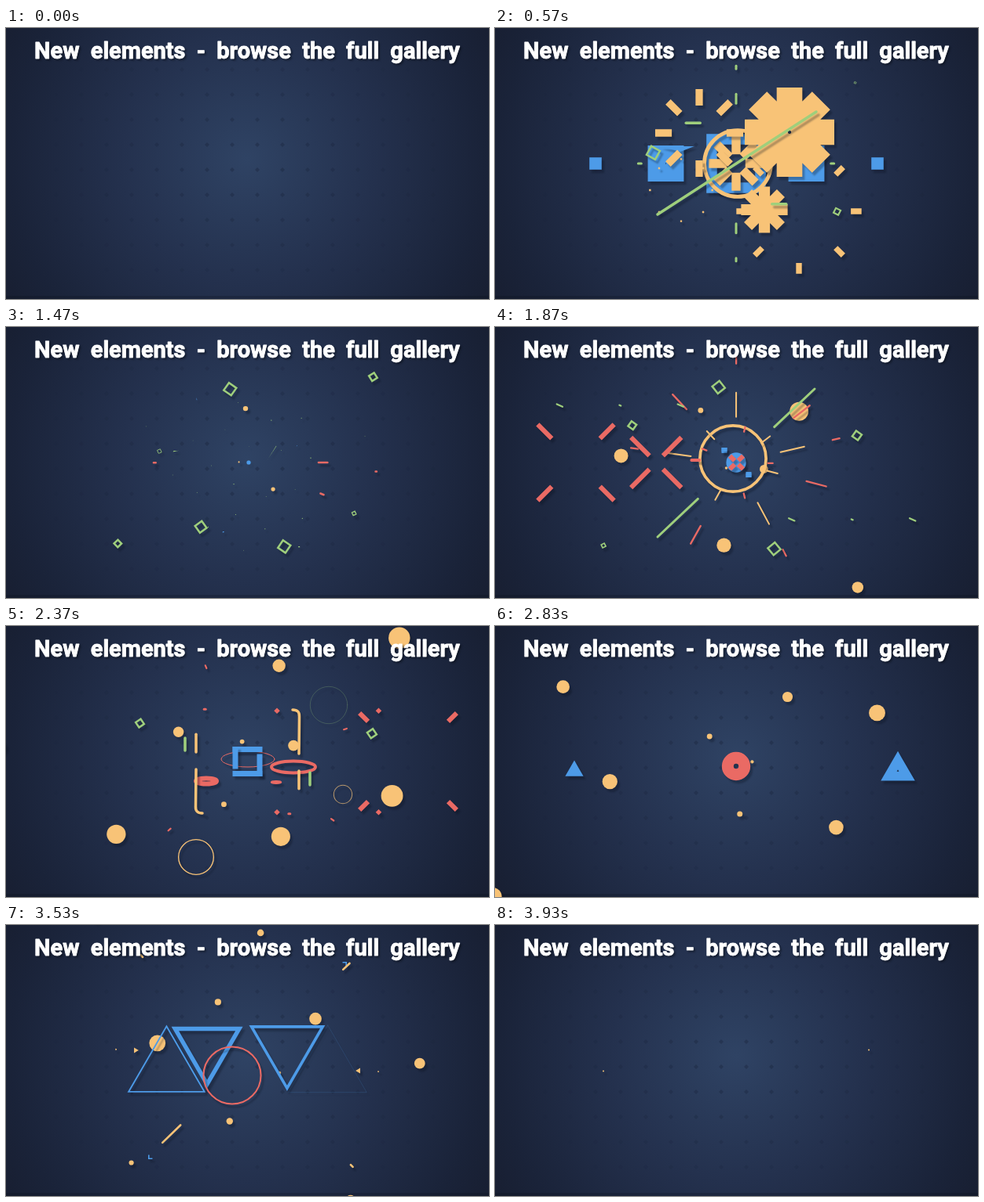
Animation, 615 px wide and 346 px high, one loop 3.96 s. Source, as an HTML page with a canvas:

```html
<!DOCTYPE html>
<html lang="en">
<head>
<meta charset="utf-8">
<title>New elements</title>
<style>
html, body { margin: 0; width: 100%; height: 100%; overflow: hidden; background: #182033; }
canvas, svg { position: absolute; left: 0; top: 0; }
canvas { background: radial-gradient(circle 353px at 307px 167px, #2f4364, #24314e 45%, #1a2339 85%, #181f32); }
text { font: 700 29px Roboto, "Open Sans", sans-serif; word-spacing: 7px; fill: #fff; stroke: #fff;
  stroke-width: .9; stroke-linejoin: round; filter: drop-shadow(2px 2px 1px rgba(8, 12, 24, .55)); }
</style>
</head>
<body>
<canvas id="stage" width="615" height="346"></canvas>
<svg width="615" height="346"><text x="307" y="39" text-anchor="middle">New elements - browse the full gallery</text></svg>
<script>
const g = document.getElementById('stage').getContext('2d');
const BLUE = '#4d9be8', GREEN = '#9fcf7c', ORANGE = '#f8c377', RED = '#ea6a64';
const CX = 307, CY = 173, LOOP = 3960, TAU = Math.PI * 2, GOLDEN = 2.39996;
let t = 0;

const clamp = v => Math.max(0, Math.min(1, v));
const out = p => 1 - (1 - p) ** 2;
const random = n => { const v = Math.sin(n * 12.9898) * 43758.5453; return v - Math.floor(v); };
// progress that equals p at time T
const at = (T, p, D) => p + (t - T) / D;
// 0 at T - a, 1 at T, 0 at T + b
const bell = (T, a, b) => clamp(t < T ? 1 + (t - T) / a : 1 - (t - T) / b);

function paint(color, width, draw) {
  g.beginPath();
  draw();
  g.fillStyle = g.strokeStyle = color;
  g.lineWidth = width;
  width ? g.stroke() : g.fill();
}
function disc(x, y, r, color, width = 0) {
  if (r > .2) paint(color, width, () => g.arc(x, y, r, 0, TAU));
}
function line(color, width, ...p) {
  paint(color, width, () => { for (let i = 0; i < p.length; i += 2) g.lineTo(p[i], p[i + 1]); });
}
// part a..b of a segment
function trim(x1, y1, x2, y2, a, b, color, width) {
  if (b - a < .01) return;
  const dx = x2 - x1, dy = y2 - y1;
  line(color, width, x1 + dx * a, y1 + dy * a, x1 + dx * b, y1 + dy * b);
}
function poly(x, y, r, n, rot, color, width) {
  if (r > .2) paint(color, width, () => {
    for (let i = 0; i < n; i++) g.lineTo(x + r * Math.cos(rot + i * TAU / n), y + r * Math.sin(rot + i * TAU / n));
    g.closePath();
  });
}
// bars around a point, filled as one shape
function rays(x, y, n, rot, inner, outer, w, color) {
  paint(color, 0, () => {
    for (let i = 0; i < n; i++) {
      const a = rot + i * TAU / n, c = Math.cos(a), s = Math.sin(a), h = w / 2;
      g.moveTo(x + c * inner + s * h, y + s * inner - c * h);
      g.lineTo(x + c * outer + s * h, y + s * outer - c * h);
      g.lineTo(x + c * outer - s * h, y + s * outer + c * h);
      g.lineTo(x + c * inner - s * h, y + s * inner + c * h);
      g.closePath();
    }
  });
}
// square that grows while its border thins
function frame(x, y, max, W, T, p, D, color) {
  p = at(T, p, D);
  if (p <= 0 || p >= 1) return;
  const s = max * out(p), w = Math.min(W * (1 - p), s / 2);
  paint(color, w, () => g.rect(x - s / 2 + w / 2, y - s / 2 + w / 2, s - w, s - w));
}
function ring(x, y, max, W, T, p, D, color) {
  p = at(T, p, D);
  if (p <= 0 || p >= 1) return;
  const r = max * out(p);
  disc(x, y, r, color, Math.min(W * (1 - p), r * 1.5));
}
function burst(x, y, max, W, p) {
  p = at(570, p, 450);
  if (p <= 0 || p >= 1) return;
  const r = max * out(p);
  rays(x, y, 8, 0, r * clamp((p - .35) / .63), r, Math.min(W * (1 - p), r), ORANGE);
}
// dash drifting away from the centre
function dash(T, x, y, angle, len, color, width) {
  const e = out(bell(T, 330, 420)), d = Math.hypot(x, y), k = 1 + (t - T) * .1 / d;
  if (!e) return;
  const dx = Math.cos(angle) * len * e / 2, dy = Math.sin(angle) * len * e / 2;
  x = CX + x * k;
  y = CY + y * k;
  line(color, width, x - dx, y - dy, x + dx, y + dy);
}
// radial dashes at one distance
function fan(T, angles, d, len, color, width) {
  for (const a of angles) dash(T, d * Math.cos(a), d * Math.sin(a), a, len, color, width);
}
// the same dash on both sides of the centre
function pair(T, x, y, angle, len, color, width) {
  for (const s of [-1, 1]) dash(T, s * x, s * y, angle, len, color, width);
}
// liquid stroke: thin tail, curve handle, round head
function taper(x0, y0, hx, hy, x1, y1, r, color) {
  const a = clamp((t - 1070) / 420), b = out(clamp(1 + (t - 1070) / 320));
  if (a >= 1 || b <= 0) return;
  paint(color, 0, () => {
    for (let i = 0; i <= 80; i++) {
      const s = i / 80, u = a + (b - a) * s, v = 1 - u, rad = (r * s ** 1.2 + .4) * (1 - a);
      const x = v * v * x0 + 2 * u * v * hx + u * u * x1, y = v * v * y0 + 2 * u * v * hy + u * u * y1;
      g.moveTo(x + rad, y);
      g.arc(x, y, rad, 0, TAU);
    }
  });
}

function backdrop() {
  g.shadowColor = 'transparent';
  for (let x = 64; x < 560; x += 32) for (let y = 53; y < 330; y += 32) {
    const a = .25 * clamp(1.15 - Math.hypot((x - CX) / 235, (y - CY) / 185));
    poly(x, y, 3, 4, 0, `rgba(14,20,38,${a})`, 0);
  }
  g.fillStyle = 'rgba(10,14,26,.22)';
  g.fillRect(0, 342, 615, 4);
  g.shadowColor = 'rgba(10,15,30,.3)';
}

// steady stream of growing balls from the centre
function stream() {
  for (let i = 0; i < 28; i++) {
    const age = t - 1280 - i * 78;
    if (age <= 0) continue;
    const d = age * (.25 + .2 * random(i + 40)), a = i * GOLDEN - 1.6;
    const r = (4 + 10 * random(i + 7)) * out(clamp(age / 550)) * clamp((3880 - t) / 450);
    disc(CX + d * Math.cos(a), CY + d * Math.sin(a), r, ORANGE);
  }
}

// x, y, size, birth
const diamonds = [
  [199, 159, 13, 300], [439, 236, 8, 350], [464, 66, 8, 500], [249, 254, 11, 600], [143, 276, 7, 780],
  [285, 78, 12, 1050], [355, 282, 12, 1080], [173, 125, 8, 1450], [463, 138, 9, 1450]
];
function drawDiamonds() {
  for (const [x, y, size, birth] of diamonds) {
    const age = (t - birth) / 1250, k = clamp(age * 5) * clamp((1 - age) * 5), drift = .96 + .08 * age;
    poly(CX + (x - CX) * drift, CY + (y - CY) * drift, size * k * .68, 4, age * .9 + 1.1, GREEN, 2.5 * k);
  }
}

function gears() {
  frame(CX, CY, 88, 36, 570, .63, 600, BLUE);
  for (const s of [-1, 1]) {
    frame(CX + s * 89.5, CY, 60, 46, 570, .52, 600, BLUE);
    frame(CX + .5 + s * 179.5, CY, 60, 36, 570, .145, 610, BLUE);
  }
  const e = bell(570, 120, 150);
  if (e) paint(BLUE, 0, () => { g.moveTo(210, 151); g.lineTo(210 + 45 * e, 151); g.lineTo(236, 158); });
  burst(CX, CY, 43, 26, .57);
  ring(309, 173, 45, 20, 570, .77, 400, ORANGE);
  burst(387, 234, 81, 58, .88);
  burst(260, 134, 60, 36, .75);
  burst(237, 207, 41, 40, .95);
  burst(375, 133, 94, 52, .38);
  burst(343, 232, 51, 22, .36);
  pair(570, 0, 83, TAU / 4, 12, GREEN, 3);
  pair(570, 0, 123, TAU / 4, 4, GREEN, 3);
  pair(570, 123, 0, 0, 4, GREEN, 3);
  pair(570, 55, 52, 0, 18, GREEN, 3.5);
  trim(207, 238, 409, 107, out(clamp((t - 575) / 260)), out(clamp((t - 330) / 235)), GREEN, 3.5);
}

function liquid() {
  const r = 64 * out(clamp((t - 720) / 330)) * clamp((1480 - t) / 330);
  if (r > 1) {
    disc(309, 173, r, BLUE, 3 * Math.min(1, r / 30));
    g.save();
    g.beginPath();
    g.arc(309, 173, r, 0, TAU);
    g.clip();
    const top = 162 + 60 * clamp((930 - t) / 200);
    paint(BLUE, 0, () => {
      for (let x = 240; x <= 380; x += 4) g.lineTo(x, top - 5 * Math.sin((x - 300) / 22 + (t - 1070) / 90));
      g.lineTo(380, 240);
      g.lineTo(240, 240);
    });
    g.restore();
  }
  taper(381, 151, 376, 147, 370, 152, 4, BLUE);
  taper(250, 63, 237, 60, 243, 93, 6, BLUE);
  taper(290, 250, 294, 262, 276, 262, 7, BLUE);
  const e = out(bell(1070, 300, 250));
  poly(322, 126, 56 * e, 3, -1.02, GREEN, 3 * e);
  // splash: a golden spiral of drops
  for (let i = 1; i < 20; i++) {
    const d = 23 * Math.sqrt(i) * out(clamp((t - 770) / 420)), a = i * GOLDEN;
    const size = (4 + 8 * random(i)) * bell(1070, 250, 420);
    disc(CX + d * Math.cos(a), CY + 12 + d * Math.sin(a), size, GREEN);
  }
  fan(1070, [0], 57, 106, RED, 2.5);
  fan(1070, [.4], 64, 42, RED, 2.5);
  fan(1070, [3.14], 78, 26, RED, 2.5);
  fan(1070, [.07], 125, 13, RED, 2.5);
  frame(278, 174, 80, 34, 1070, .68, 500, RED);
  taper(345, 152, 280, 147, 213, 159, 6.2, GREEN);
  taper(245, 256, 231, 332, 344, 152, 6.2, GREEN);
  taper(322, 235, 350, 282, 374, 281, 6.2, GREEN);
}

// row of four-armed pops, left to right
function crosses() {
  for (let i = 0; i < 5; i++) {
    const age = t - 1570 - i * 100;
    if (age <= 0 || age >= 550) continue;
    const r = 46 * (1 - Math.cos(Math.PI * Math.min(1, age / 520)));
    const len = Math.min(r * 1.15, (550 - age) * .1);
    rays(103 + i * 102.25, CY, 4, TAU / 8, r - len / 2, r + len / 2, Math.min(6, len), RED);
  }
}

const STRAIGHT = [-1.57, -.23, 1.08, 3.28], SLANTED = [-2.32, -.66, .26, 2.08];
const turned = (angles, by) => angles.map(a => a + by);

function sparks() {
  const T = 1870;
  ring(303, 168, 44, 18, T, .8, 450, ORANGE);
  const half = .5 * clamp((t - 1600) / 150), gap = .5 * clamp((t - 1750) / 240);
  trim(207, 268, 407, 79, .5 - half, .5 - gap, GREEN, 3);
  trim(207, 268, 407, 79, .5 + gap, .5 + half, GREEN, 3);
  fan(T, STRAIGHT, 74, 31, ORANGE, 2);
  fan(T, SLANTED, 48, 14, ORANGE, 2);
  fan(T, SLANTED, 106, 26, RED, 2.3);
  fan(T, STRAIGHT, 131, 9, RED, 2.3);
  fan(T, turned(STRAIGHT, .25), 44, 6, RED, 2.3);
  for (let i = 0; i < 3; i++) pair(T, 71 + 77 * i, 73, .42, i === 1 ? 2 : 8, GREEN, 2.2);
  dash(T, -52, -3, 0, 10, RED, 4);
  disc(CX, CY, 13 * bell(T, 120, 200), BLUE);
}

// two opposite corners that close into a square
function brackets() {
  const k = clamp((t - 1800) / 540), w = 7 * clamp((2680 - t) / 260);
  if (!k || !w) return;
  const h = 15.5 + 5 * clamp((t - 2370) / 310), a = 7 + 2 * h * clamp((t - 1870) / 470);
  g.lineCap = 'butt';
  for (const s of [-1, 1]) {
    const x = CX + .5 + s * h, y = CY + s * h, e = s * w / 2;
    line(BLUE, w, x + e, y, x + e - s * a, y);
    line(BLUE, w, x, y + e, x, y + e - s * a * .75);
  }
  g.lineCap = 'round';
}

function orbits() {
  const T = 2370, e = bell(T, 300, 350);
  const oval = (x, y, rx, ry, w) => {
    if (e) paint(RED, w * Math.min(1, e * 1.5), () => g.ellipse(x, y, rx * out(e), ry * out(e), 0, 0, TAU));
  };
  oval(308, 170, 34, 10, 1);
  brackets();
  oval(366, 180, 28, 7.5, 4);
  oval(255, 198, 13, 3.5, 6);
  oval(344, 199.5, 6, 1.2, 2.5);
  ring(411, 101, 24, 5, T, .9, 450, 'rgba(159,207,124,.45)');
  ring(242, 295, 23, 8, T, .84, 450, ORANGE);
  ring(429, 215, 12, 6, T, .84, 450, 'rgba(248,195,119,.7)');
  if (e) for (const s of [-1, 1]) {
    g.save();
    g.translate(CX + .5, CY);
    g.scale(s, s);
    trim(-65.5, -35, -65.5, -12, 1 - e, 1, ORANGE, 3.5);
    trim(-79.5, -30, -79.5, -14, .5 - e / 2, .5 + e / 2, GREEN, 3.5);
    paint(ORANGE, 3.5, () => {
      g.moveTo(-65.5, 10);
      g.lineTo(-66, 10 + 48 * e);
      if (e > .8) g.quadraticCurveTo(-66.5, 66, -57.5, 66);
    });
    g.restore();
  }
  fan(T, turned(SLANTED, .34), 132, 4, RED, 2.2);
  pair(T, 54, 67, 0, 2, RED, 3);
}

function triangles() {
  const T = 3230;
  for (let i = 0; i < 8; i++) {
    const p = at(T, 1 - i / 8, 528);
    if (p <= 0 || p > 1.08) continue;
    // the outer ones come first, right and left by turns
    const x = i % 2 ? 101 + 51.7 * (i - 1) / 2 : 513 - 51.7 * i / 2, up = i % 4 < 2;
    const R = 100 * out(p) / Math.sqrt(3), w = Math.min(14 * (1 - p) + 1.2, R * .98);
    poly(x, up ? 185 : 156, R - w, 3, TAU / 4 * (up ? -1 : 1), BLUE, w);
  }
  ring(CX, 179, 35, 18, T, .96, 500, RED);
  ring(327, 153, 32, 18, T, .72, 500, RED);
  ring(288, 192, 37, 18, T, .28, 500, RED);
  const e = bell(T, 300, 350), m = (t - T) * .06;
  if (e) for (const s of [-1, 1]) {
    const x = CX + .5 + s * (107.5 + m), y = CY - s * (107 + m), a = 35 * e * s, w = 6 * Math.min(1, e * 2);
    g.lineCap = 'butt';
    line(BLUE, w, x - a, y, x, y, x, y + a);
    g.lineCap = 'round';
  }
  fan(T, [2.37], 104, 67, ORANGE, 2.6);
  fan(T, [-.76], 144, 24, ORANGE, 2.6);
  fan(T, [-2.36, .79], 159, 8, ORANGE, 2.6);
  const b = bell(T, 250, 400);
  for (const s of [-1, 1]) {
    const rot = s > 0 ? Math.PI : 0;
    poly(CX + s * 142, CY + s * 13, 8 * b, 3, rot, ORANGE, 2);
    poly(CX + s * 167, CY + s * 14, 2.3 * b, 3, rot, ORANGE, 1);
    disc(CX + s * 169, CY - s * 13.5, 2.5 * bell(3800, 150, 220), ORANGE);
  }
}

function draw(now) {
  // the picture advances in steps of a thirtieth of a second
  t = Math.floor((now % LOOP + 3.4) * .03) / .03;
  g.clearRect(0, 0, 615, 346);
  g.lineCap = 'round';
  g.lineJoin = 'miter';
  g.shadowOffsetX = 3;
  g.shadowOffsetY = 4;
  g.shadowBlur = 2;
  backdrop();
  stream();
  gears();
  liquid();
  sparks();
  crosses();
  orbits();
  triangles();
  drawDiamonds();
  requestAnimationFrame(() => draw(performance.now() - start));
}
const start = performance.now();
draw(0);
</script>
</body>
</html>
```
